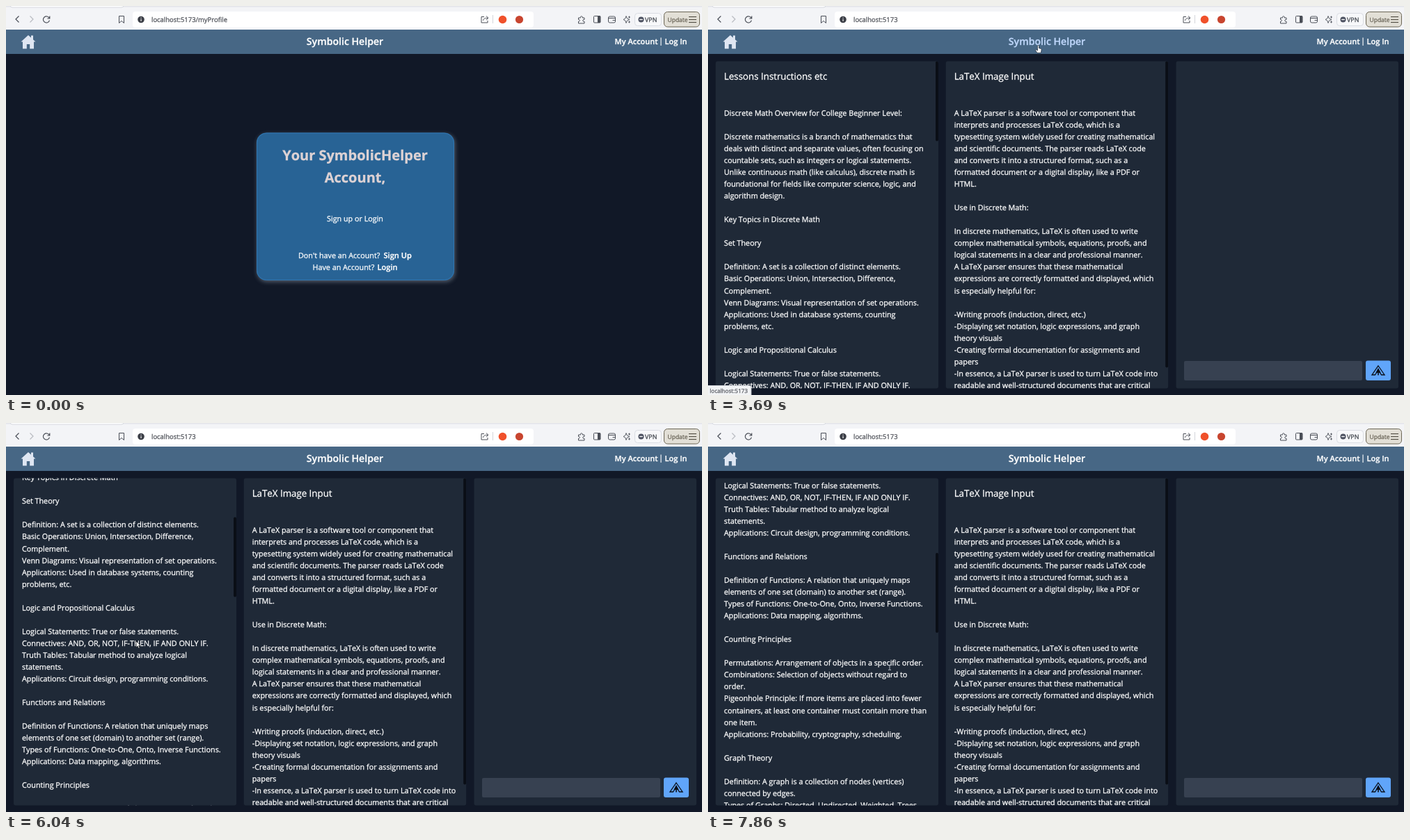
An HTML page with a canvas for the animation above (8 s loop, 1000x560 px).

```html
<!DOCTYPE html>
<html lang="en">
<head>
<meta charset="utf-8">
<title>Lesson page</title>
<style>
html, body { margin: 0; width: 100%; height: 100%; overflow: hidden; background: #111827; }
canvas { display: block; width: 1000px; height: 560px; text-rendering: geometricPrecision; }
</style>
</head>
<body>
<canvas id="stage" width="1000" height="560"></canvas>
<script>
const ctx = document.getElementById('stage').getContext('2d');
const LOOP = 8000, LINE = 17.04, TOP = 79.5, BOTTOM = 550.5;
const FACE = '"Open Sans", "Noto Sans", sans-serif';

const lessons = `Discrete Math Overview for College Beginner Level:

Discrete mathematics is a branch of mathematics that
deals with distinct and separate values, often focusing on
countable sets, such as integers or logical statements.
Unlike continuous math (like calculus), discrete math is
foundational for fields like computer science, logic, and
algorithm design.

Key Topics in Discrete Math

Set Theory

Definition: A set is a collection of distinct elements.
Basic Operations: Union, Intersection, Difference,
Complement.
Venn Diagrams: Visual representation of set operations.
Applications: Used in database systems, counting
problems, etc.

Logic and Propositional Calculus

Logical Statements: True or false statements.
Connectives: AND, OR, NOT, IF-THEN, IF AND ONLY IF.
Truth Tables: Tabular method to analyze logical
statements.
Applications: Circuit design, programming conditions.

Functions and Relations

Definition of Functions: A relation that uniquely maps
elements of one set (domain) to another set (range).
Types of Functions: One-to-One, Onto, Inverse Functions.
Applications: Data mapping, algorithms.

Counting Principles

Permutations: Arrangement of objects in a specific order.
Combinations: Selection of objects without regard to
order.
Pigeonhole Principle: If more items are placed into fewer
containers, at least one container must contain more than
one item.
Applications: Probability, cryptography, scheduling.

Graph Theory

Definition: A graph is a collection of nodes (vertices)
connected by edges.
Types of Graphs: Directed, Undirected, Weighted, Trees.`.split('\n');

const latex = `A LaTeX parser is a software tool or component that
interprets and processes LaTeX code, which is a
typesetting system widely used for creating mathematical
and scientific documents. The parser reads LaTeX code
and converts it into a structured format, such as a
formatted document or a digital display, like a PDF or
HTML.

Use in Discrete Math:

In discrete mathematics, LaTeX is often used to write
complex mathematical symbols, equations, proofs, and
logical statements in a clear and professional manner.
A LaTeX parser ensures that these mathematical
expressions are correctly formatted and displayed, which
is especially helpful for:

-Writing proofs (induction, direct, etc.)
-Displaying set notation, logic expressions, and graph
theory visuals
-Creating formal documentation for assignments and
papers
-In essence, a LaTeX parser is used to turn LaTeX code into
readable and well-structured documents that are critical`.split('\n');

// Held steps: [start time, values...]
const pointer = [
  [330, 925, 532], [500, 774, 344], [850, 640, 300], [1000, 517, 261],
  [1350, 508, 180], [1500, 500, 122], [1840, 495, 105], [2000, 490, 88],
  [2170, 480, 66], [2340, 476, 60], [2510, 474.5, 56.5], [4190, 440, 120],
  [4360, 330, 220], [4520, 230, 290], [4690, 187, 314], [6870, 250, 310],
  [7030, 330, 320], [7200, 324, 330], [7360, 300, 340], [7690, 270, 347], [7860, 261, 349]
];
const scroll = [
  [0, 0], [5190, 14], [5360, 50.5], [5520, 71], [5690, 120], [5860, 180], [6040, 229],
  [6190, 275], [6370, 298], [6530, 390], [6700, 439.5], [7690, 439]
];
const held = (steps, t) => steps.filter(s => s[0] <= t).pop();
const between = (t, a, b) => t >= a && t < b;

// A hairline stroke gives the type its slightly heavier colour.
function text(str, x, y, size, color = '#fff', weight = 400, align = 'left') {
  ctx.font = `${weight} ${size}px ${FACE}`;
  ctx.textRendering = 'geometricPrecision';
  ctx.fontKerning = 'none';
  ctx.textAlign = align;
  ctx.fillStyle = ctx.strokeStyle = color;
  ctx.lineWidth = .28;
  ctx.fillText(str, x, y);
  ctx.strokeText(str, x, y);
}

function box(x, y, w, h, r, fill, stroke) {
  ctx.beginPath();
  ctx.roundRect(x, y, w, h, r);
  if (fill) { ctx.fillStyle = fill; ctx.fill(); }
  if (stroke) { ctx.strokeStyle = stroke; ctx.lineWidth = 1; ctx.stroke(); }
}

function dot(x, y, r, fill) {
  ctx.beginPath();
  ctx.arc(x, y, r, 0, 7);
  ctx.fillStyle = fill;
  ctx.fill();
}

function shape(d, x, y, fill, stroke, width = 1) {
  const p = new Path2D(d);
  ctx.save();
  ctx.translate(x, y);
  if (fill) { ctx.fillStyle = fill; ctx.fill(p); }
  if (stroke) { ctx.strokeStyle = stroke; ctx.lineWidth = width; ctx.stroke(p); }
  ctx.restore();
}

function toolbar(url) {
  const ink = '#4a4e57';
  box(0, 0, 1000, 34, 0, '#f3f4f7');
  box(0, 0, 1000, 1.5, 0, '#e3e5ea');
  box(6, -4, 163, 6, 3, '#fff', '#d5d8de');
  box(182, 8, 576, 23, 4, '#fff');
  shape('M2.5 -4.5L-2 0L2.5 4.5', 16, 19, null, ink, 1.2);
  shape('M-2.5 -4.5L2 0L-2.5 4.5', 37, 19, null, '#b8bbc1', 1.2);
  shape('M4.3 -1.6A4.6 4.6 0 1 0 4.5 1.3M4.8 -4.8V-1.3H1.3', 58, 19.3, null, ink, 1.2);
  shape('M-3.5 -5H3.5V5L0 2L-3.5 5Z', 166, 19.5, null, ink);
  dot(194, 19.5, 4.8, '#3b3e46');
  box(193.5, 18.8, 1.1, 3.2, 0, '#fff');
  box(193.5, 16.6, 1.1, 1.1, 0, '#fff');
  text(url, 209, 22.7, 9.43, '#50535a');
  shape('M-1 -4H-5V4.5H4V1.5M-2.5 1.5C-2 -1.5 0 -2.2 4.5 -2.2M2 -5L5 -2.2L2 .6', 688, 19.5, null, ink);
  box(699, 13, 1, 12, 0, '#d4d6da');
  dot(713.5, 19.5, 5.8, '#f0512b');
  dot(737.5, 19.5, 5.6, '#c8452f');
  shape('M-4.5 -3H-1.5C-2.5 -6 2 -6 1.2 -3H4V-.5C1 -1 1 3 4 2.2V5H-4.5V2.2C-2 2.5 -2 -1 -4.5 -.5Z', 827, 20, null, ink);
  box(844.5, 14.5, 9.5, 9.5, 1, null, ink);
  box(850, 14.5, 4, 9.5, 0, ink);
  box(865.5, 15, 10, 9, 2, null, ink);
  shape('M-5 -1.5H5M1 1.5H5', 870.5, 19, null, ink);
  shape('M-1 -5Q-.5 -.5 4 0Q-.5 .5 -1 5Q-1.5 .5 -5 0Q-1.5 -.5 -1 -5ZM3.5 -5V-2M2 -3.5H5M3.5 2V5M2 3.5H5', 892, 19.5, null, ink, .9);
  box(903.5, 10.5, 38, 18, 4, '#f7f8fa', '#d9dce2');
  dot(912.5, 19.5, 4, '#4b5060');
  box(910.2, 18.8, 4.6, 1.4, 0, '#fff');
  text('VPN', 918, 22.7, 8.9, '#3f434b');
  box(945.5, 8.5, 51, 21.5, 5, '#e2dfd6', '#6d6755');
  text('Update', 950.5, 22.5, 8.5, '#6a6558');
  for (const y of [15, 19, 23]) box(981, y, 11, 1.1, 0, '#4e4a40');
}

function header(hover, pressed) {
  box(0, 34, 1000, 35, 0, '#476785');
  shape('M0 -10L10.5 -.5H8V9.5H2.2V3H-2.2V9.5H-8V-.5H-10.5ZM4 -9.5H7V-3H4Z', 32, 52, '#dfe6f2');
  text('Symbolic Helper', 487, 55.5, pressed ? 12.8 : 14.1, hover ? '#bfd7fb' : '#fff', 600, 'center');
  text('My Account', 874.5, 54.5, 11, '#fff', 600);
  box(940.5, 45.5, 1.1, 11.5, 0, '#fff');
  text('Log In', 946.5, 54.5, 11, '#fff', 600);
}

function card() {
  ctx.save();
  ctx.shadowColor = 'rgba(190,205,220,.4)';
  ctx.shadowBlur = 6;
  ctx.shadowOffsetX = 1;
  ctx.shadowOffsetY = 2;
  box(360, 182.5, 284, 212.5, 14, '#286395');
  ctx.restore();
  box(360.5, 183, 283, 211.5, 14, null, '#3177b3');
  text('Your SymbolicHelper', 501.5, 222, 20, '#ddd2d4', 700, 'center');
  text('Account,', 501.5, 254, 20, '#ddd2d4', 700, 'center');
  text('Sign up or Login', 501.5, 310, 10.78, '#fff', 400, 'center');
  text("Don't have an Account?", 420, 363, 10.78);
  text('Sign Up', 542.5, 363, 11.1, '#fff', 600);
  text('Have an Account?', 440.5, 380, 10.78);
  text('Login', 533.5, 380, 11.1, '#fff', 600);
}

function panel(x, w, title, lines, offset, thumb) {
  ctx.save();
  box(x, TOP, w, BOTTOM - TOP, 3, '#1f2937');
  ctx.clip();
  if (title) {
    text(title, x + 12, Math.round(106.4 - offset), 13.3);
    lines.forEach((line, i) => text(line, x + 12, Math.round(157.9 + i * LINE - offset), 10.78));
    box(x + w - 4, TOP + offset * .2447, 4, thumb, 2, '#0a0e16');
  }
  ctx.restore();
}

function lessonPage(offset) {
  panel(11, 320, 'Lessons Instructions etc', lessons, offset, 115);
  panel(341.7, 319.5, 'LaTeX Image Input', latex, 0, 441);
  panel(672.5, 319.5);
  box(684, 511, 256, 28, 2, '#374151');
  box(945, 510.5, 36, 28.5, 3, '#60a5fa');
  shape('M0 -7L9 6H4.5L0 -1L-4.5 6H-9Z', 963, 525, null, '#0a0f18', 1.3);
  shape('M0 -4L3.6 3H.8V6.5H-.8V3H-3.6Z', 963, 525, '#0a0f18');
}

function status() {
  box(-1, 546.5, 63, 15, [0, 3, 0, 0], '#f1f3f5', '#c9ccd2');
  text('localhost:5173', 2.5, 557, 8.1, '#5c5f66');
}

function drawPointer(t, hand, pressed) {
  const p = held(pointer, t);
  if (!p) return;
  const [, x, y] = p;
  if (pressed) dot(474, 57, 8.7, 'rgba(205,200,25,.85)');
  if (hand) {
    shape('M-1 .8Q0 -.6 1 .8V4.2L4 5Q4.8 5.3 4.6 6.5L3.8 11H-1.5L-4 7.3Q-4 6 -2.7 6.4L-1 7.6Z', x, y, '#fff', '#1b2533', .7);
  } else if (t >= 7690) {
    shape('M-2 -.5H-.6L0 0L.6 -.5H2M0 0V6M-2 6.5H-.6L0 6L.6 6.5H2', x, y, null, '#c5cad2', .9);
  } else {
    shape('M0 0V9L2.1 7.1L3.5 10.3L5 9.6L3.6 6.5H6.3Z', x, y, '#fff', '#111', .6);
  }
}

function draw(t) {
  const hover = between(t, 2170, 4190);
  const pressed = between(t, 3360, 3690);
  const lesson = t >= 3690;
  box(0, 0, 1000, 560, 0, '#111827');
  toolbar(lesson ? 'localhost:5173' : 'localhost:5173/myProfile');
  header(hover, pressed);
  if (lesson) lessonPage(held(scroll, t)[1]);
  else card();
  if (between(t, 2340, 4360)) status();
  drawPointer(t, hover, pressed);
}

const start = performance.now();
function tick() {
  draw((performance.now() - start) % LOOP);
  requestAnimationFrame(tick);
}
tick();
</script>
</body>
</html>
```
